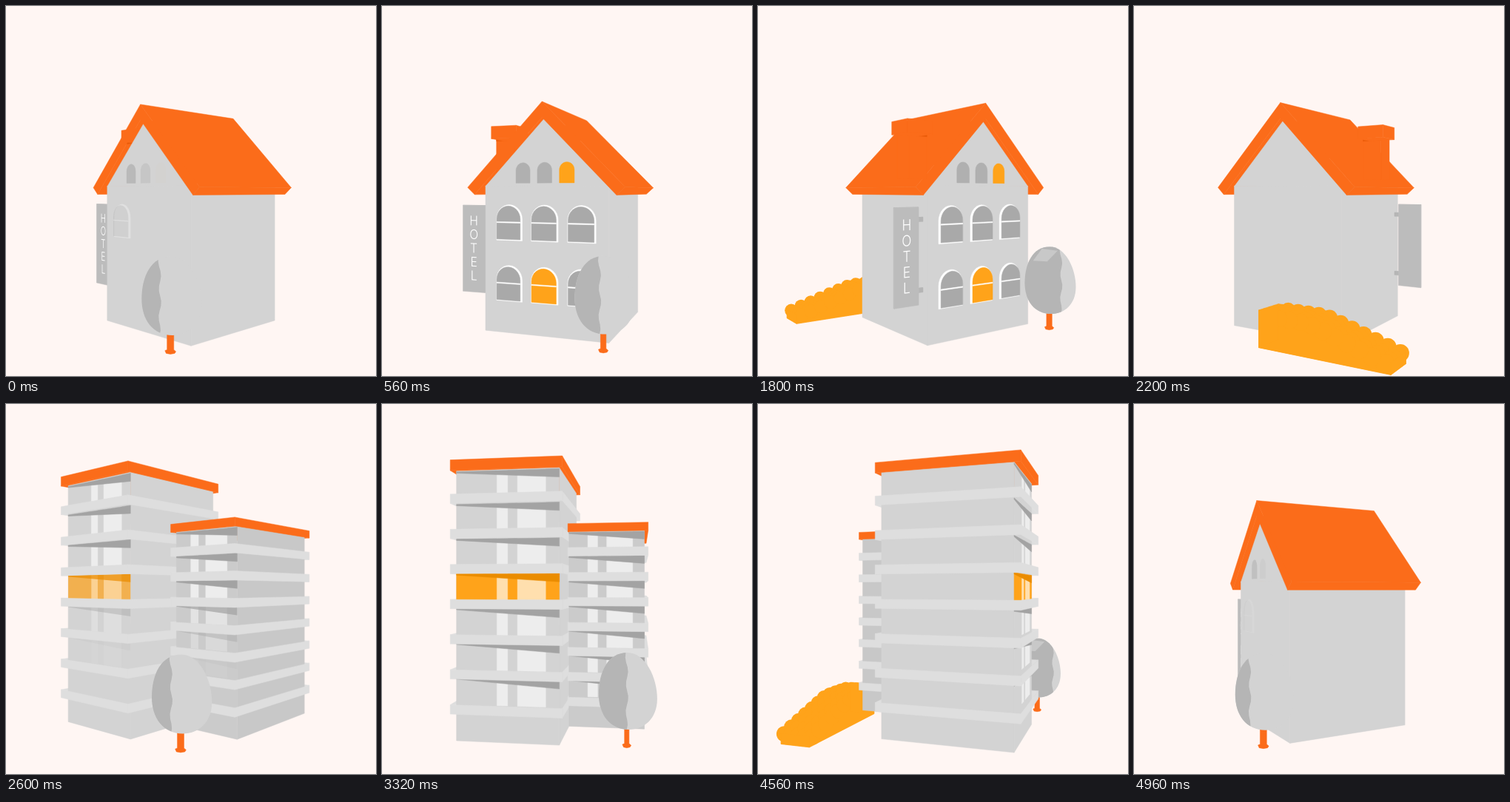
Write an HTML page with a canvas that moves like this. It is 500 by 500 pixels and loops after 5000 ms.

```html
<!DOCTYPE html>
<html lang="en">
<head>
<meta charset="utf-8">
<title>Turning buildings</title>
<style>
html, body { margin: 0; height: 100%; overflow: hidden; background: #fff6f3; }
canvas { display: block; width: 500px; height: 500px; }
</style>
</head>
<body>
<canvas id="stage" width="500" height="500"></canvas>
<script>
const ctx = document.getElementById('stage').getContext('2d');
const DIST = 690, GROUND = 175;
const PAPER = '#fff6f3', ORANGE = '#fb6c1a', RUST = '#e85a08', YELLOW = '#ffa31a';
const WALL = '#d3d3d3', SIDE = '#c8c8c8', BAND = '#dedede', SHADE = '#a3a3a3';

let sin, cos, eyeX, eyeZ, size, time;

const clamp = v => Math.max(0, Math.min(1, v));

// x right, y down, z towards the viewer; the scene turns about the vertical axis
function project([x, y, z]) {
  x *= size;
  z *= size;
  const s = DIST / (DIST + x * sin - z * cos);
  const h = GROUND + (y - GROUND) * size;
  return [250 + (x * cos + z * sin) * s, 250 + h * s, s];
}

function fillPath(color, points) {
  ctx.beginPath();
  for (const [x, y] of points) ctx.lineTo(x, y);
  ctx.closePath();
  ctx.fillStyle = ctx.strokeStyle = color;
  ctx.lineWidth = 0.5;
  ctx.fill();
  if (ctx.globalAlpha === 1) ctx.stroke();
}

const face = (color, points) => fillPath(color, points.map(project));
const flat = (color, z, points) => face(color, points.map(([x, y]) => [x, y, z]));
const rect = (color, x0, x1, y0, y1, z) => flat(color, z, [[x0, y0], [x1, y0], [x1, y1], [x0, y1]]);

function boxLevels(x0, x1, y0, y1, z0, z1, color) {
  const level = y => face(color, [[x0, y, z0], [x1, y, z0], [x1, y, z1], [x0, y, z1]]);
  if (y0 > 0) level(y0);
  if (y1 < 0) level(y1);
}

function boxSides(x0, x1, y0, y1, z0, z1, color, side = color) {
  const upright = x => face(side, [[x, y0, z0], [x, y0, z1], [x, y1, z1], [x, y1, z0]]);
  if (eyeX > x1) upright(x1);
  if (eyeX < x0) upright(x0);
  if (eyeZ > z1) rect(color, x0, x1, y0, y1, z1);
  if (eyeZ < z0) rect(color, x0, x1, y0, y1, z0);
}

function box(...args) {
  boxLevels(...args);
  boxSides(...args);
}

function arch(color, cx, half, top, bottom, z) {
  const points = [[cx + half, bottom], [cx - half, bottom]];
  for (let i = 0; i <= 14; i++) {
    const a = Math.PI * (1 + i / 14);
    points.push([cx + half * Math.cos(a), top + half * (1 + Math.sin(a))]);
  }
  flat(color, z, points);
}

function houseWindows() {
  for (let row = 0; row < 3; row++) for (let col = 0; col < 3; col++) {
    ctx.globalAlpha = clamp((time + 145 - 72 * (col + 1.2 * row)) / 200);
    if (!row) {
      arch(col === 2 ? YELLOW : '#b0b0b0', 28.5 * (col - 1), 9.4, -34.5, -9.7, 80);
      continue;
    }
    const x = 47 * (col - 1), y = row === 1 ? 17 : 92;
    arch('#fff', x, 17.5, y, y + 44, 80);
    arch(row === 2 && col === 1 ? YELLOW : '#a9a9a9', x, 16, y + 1.5, y + 42.5, 82.5);
    rect('#fff', x - 16, x + 16, y + 21, y + 22.2, 82.5);
  }
  ctx.globalAlpha = 1;
}

function sign() {
  for (const y of [30, 111]) box(-86, -80, y, y + 5, 69, 71, '#b5b5b5');
  box(-118, -86, 18.5, 130, 69, 71, '#bcbcbc');
  if (eyeZ < 71) return;
  ctx.font = '300 17px Inter, Roboto, sans-serif';
  ctx.textAlign = 'center';
  ctx.textBaseline = 'middle';
  ctx.fillStyle = '#fff';
  [...'HOTEL'].forEach((letter, i) => {
    const y = 38 + 17.7 * i;
    const [ox, oy] = project([-102, y, 71]);
    const [ax, ay] = project([-101, y, 71]);
    const [bx, by] = project([-102, y + 1, 71]);
    ctx.save();
    ctx.transform(ax - ox, ay - oy, bx - ox, by - oy, ox, oy);
    ctx.fillText(letter, 0, 1);
    ctx.restore();
  });
}

function chimney() {
  box(-83, -57, -69, -15, 19, 45, ORANGE);
  if (eyeZ > 45) rect(RUST, -83, -57, -69, -66, 45);
  if (eyeZ < 19) rect(RUST, -83, -57, -69, -66, 19);
  box(-88, -52, -85, -69, 14, 50, ORANGE);
}

function house() {
  const slope = (side, x0, y0, x1, y1) => face(ORANGE, [
    [side * x0, y0, 88], [side * x1, y1, 88], [side * x1, y1, -88], [side * x0, y0, -88]]);
  const gable = z => flat(ORANGE, z, [[0, -106.5], [101, -4.5], [91, 4.5], [0, -87.5],
    [-91, 4.5], [-101, -4.5]]);
  const leftRoofSeen = -eyeX > 106;

  for (const side of [-1, 1]) if (side * eyeX < 87) slope(side, 0, -87.5, 91, 4.5);
  if (!leftRoofSeen) chimney();
  if (eyeX >= -80) sign();
  box(-80, 80, -6.6, GROUND, -80, 80, WALL);
  for (const z of [-80, 80]) if (eyeZ * z > 6400) {
    flat(WALL, z, [[-80, -6], [0, -87.5], [80, -6]]);
  }
  if (eyeZ > 82) houseWindows();
  for (const side of [-1, 1]) {
    if (side * eyeX > 106) slope(side, 0, -106.5, 101, -4.5);
    if (side * eyeX > 96) slope(side, 101, -4.5, 91, 4.5);
  }
  if (eyeZ > 88) gable(88);
  if (eyeZ < -88) gable(-88);
  if (leftRoofSeen) chimney();
  if (eyeX < -80) sign();
}

function tower({ x0, x1, z0, z1, top, roof, first, pitch, inset, litFloor, ledge, front, side }) {
  const slabs = [[top, roof, ORANGE]];
  for (let i = 0; i < 7; i++) slabs.push([first + pitch * i, 10.5, BAND]);
  const eachSlab = draw => slabs.forEach(([y, h, color]) =>
    draw(x0 - ledge, x1 + 4.5, y, y + h, z0 - 6, z1 + front, color));

  eachSlab(boxLevels);
  boxSides(x0, x1, top + roof - 1, GROUND, z0, z1, side === WALL ? WALL : '#cbcbcb', side);
  if (eyeZ > z1) for (let i = 0; i < 7; i++) {
    const y0 = slabs[i][0] + slabs[i][1], y1 = slabs[i + 1][0] + 1;
    const lit = i === litFloor, x = x0 + inset;
    ctx.globalAlpha = clamp((time + 60 - 30 * i) / 100);
    if (lit) rect(YELLOW, x0, x1, y0, y1, z1);
    for (const [a, b] of [[0, 12.5], [24, 56.5]]) {
      rect(lit ? '#ffdfae' : '#ededed', x + a, x + b, y0, y1, z1);
    }
    flat(lit ? '#ea8c00' : SHADE, z1, [[x0, y0], [x1, y0], [x1, y0 + 9.5], [x0, y0 + 1.5]]);
  }
  ctx.globalAlpha = 1;
  eachSlab(boxSides);
}

const TALL = { x0: -112, x1: 8, z0: -38, z1: 118, top: -147, roof: 12, first: -108, pitch: 40,
  inset: 48, litFloor: 3, ledge: 4.5, front: 8, side: WALL };
const LOW = { x0: 8, x1: 103, z0: -125, z1: 38, top: -82, roof: 10, first: -52, pitch: 31.3,
  inset: 24, litFloor: -1, ledge: 0, front: 11, side: SIDE };

function offices() {
  for (const part of eyeX > 8 ? [TALL, LOW] : [LOW, TALL]) tower(part);
}

function hedge() {
  const left = -166, right = -6, near = -100, far = -137;
  const height = x => 17 + 28 * clamp((x - left) / 95);
  const ground = [[left, GROUND, near], [left, GROUND, far], [right, GROUND, far], [right, GROUND, near]];
  face(YELLOW, ground);
  for (let i = 0; i <= 4; i++) {
    const z = eyeZ > 0 ? far + (near - far) * i / 4 : near + (far - near) * i / 4;
    flat(YELLOW, z, [[left, GROUND], [right, GROUND], [right, 133],
      [left + 95, 133], [left, GROUND - 12]]);
    for (let x = left + 6; x < right; x += 14) {
      const [px, py, s] = project([x, GROUND - height(x) + 9, z]);
      ctx.beginPath();
      ctx.arc(px, py, 9 * s, 0, 7);
      ctx.fill();
    }
  }
  for (const [x, h] of [[left, 12], [right, 42]]) {
    face(YELLOW, [[x, GROUND, near], [x, GROUND, far], [x, GROUND - h, far], [x, GROUND - h, near]]);
  }
}

function tree() {
  const [x, ground, s] = project([83, GROUND, 114.5]);
  const w = (4.3 * Math.abs(cos) + 5.9 * Math.abs(sin)) / 2;
  const at = (px, py) => [px * s, py * s];
  ctx.save();
  ctx.translate(x, ground);
  fillPath(ORANGE, [at(-w, -26), at(w, -26), at(w, -4), at(w + 2.3, -2), at(w + 1, 0),
    at(0, 0.8), at(-w - 1, 0), at(-w - 2.3, -3), at(-w, -4)]);

  ctx.scale(33 * s, 42.5 * s);
  ctx.translate(0.02, -62 / 42.5);
  ctx.beginPath();
  ctx.moveTo(0, -1);
  ctx.bezierCurveTo(0.6, -1, 1, -0.35, 1, 0.2);
  ctx.bezierCurveTo(1, 0.72, 0.55, 1, 0.05, 1);
  ctx.bezierCurveTo(-0.6, 1, -0.96, 0.6, -0.96, 0.08);
  ctx.bezierCurveTo(-0.96, -0.5, -0.65, -1, 0, -1);
  ctx.fillStyle = WALL;
  ctx.fill();
  ctx.clip();
  const edge = 0.08 + 0.62 * sin;
  ctx.fillStyle = '#b5b5b5';
  ctx.beginPath();
  ctx.moveTo(-2, -1);
  for (let i = 0; i <= 16; i++) {
    const y = i / 8 - 1;
    ctx.lineTo(edge + 0.04 * Math.sin(y * 9) - 0.03 * y * y, y);
  }
  ctx.lineTo(-2, 1);
  ctx.fill();
  if (sin > 0.2) {
    ctx.fillStyle = SIDE;
    ctx.beginPath();
    for (const [px, py] of [[-0.64, -0.58], [-0.1, -0.56], [0.3, -0.88], [-0.3, -0.94]]) {
      ctx.lineTo(px, py);
    }
    ctx.fill();
  }
  ctx.restore();
}

function turn(u) {
  if (u < 2000) return -45 + 0.045 * u;
  const v = (u - 2000) / 500;
  return 45 + 270 * (v - 0.22 * Math.sin(2 * Math.PI * v) / (2 * Math.PI));
}

// a new building pops up, slightly overshooting
function popSize(u) {
  if (u < 2220) return 1;
  const p = (u - 2220) / 280;
  return 1 - 0.055 * (1 - p) + 0.065 * Math.sin(Math.PI * p);
}

function draw(ms) {
  const t = ms % 5000, u = t % 2500;
  const angle = turn(u) * Math.PI / 180;
  sin = Math.sin(angle);
  cos = Math.cos(angle);
  eyeX = -DIST * sin;
  eyeZ = DIST * cos;
  time = u >= 2220 ? u - 2500 : u;
  const building = t >= 2220 && t < 4720 ? offices : house;

  ctx.fillStyle = PAPER;
  ctx.fillRect(0, 0, 500, 500);
  size = 1;
  const hedgeInFront = eyeZ < -90;
  const treeInFront = 83 * -sin + 114.5 * cos > 0;
  if (!hedgeInFront) hedge();
  if (!treeInFront) tree();
  size = popSize(u);
  building();
  size = 1;
  if (treeInFront) tree();
  if (hedgeInFront) hedge();
}

const start = performance.now();
function tick() {
  draw(performance.now() - start);
  requestAnimationFrame(tick);
}
tick();
</script>
</body>
</html>
```
